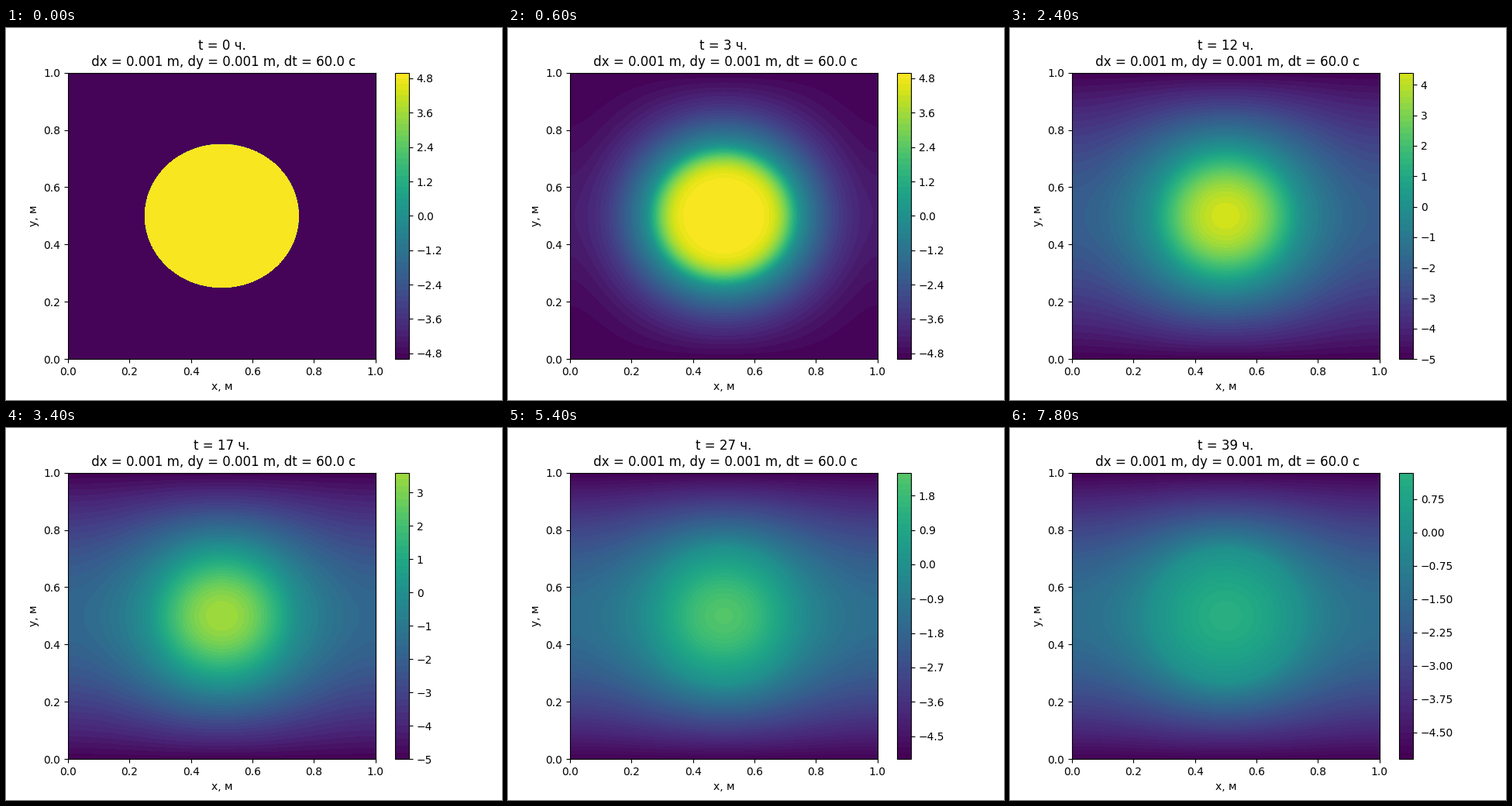
A matplotlib script that plays this animation: 640x480 px, repeating every 8000 ms.

```python
import numpy as np
import matplotlib.pyplot as plt
from matplotlib.animation import FuncAnimation

HOURS = 40
T_HOT, T_COLD, RADIUS = 5.0, -5.0, 0.25

# Water / ice: conductivity, volumetric heat capacity, latent heat
K_W, K_I = 0.56, 2.2
C_W, C_I = 4.2e6, 1.926e6
LATENT = 3.2e8
SMEAR = 0.1            # half-width of the melting range, degrees

# Piecewise-linear links between temperature, enthalpy and heat potential
T_PTS = np.array([-10, -SMEAR, SMEAR, 10])
SPAN = 10 - SMEAR
H_PTS = np.array([-C_I * SPAN, 0, LATENT, LATENT + C_W * SPAN])
MUSH = SMEAR * (K_W + K_I)
U_PTS = np.array([-K_I * SPAN, 0, MUSH, MUSH + K_W * SPAN])

N = 80                 # cells in one quarter of the unit square
CELL = 0.5 / N
STEPS = 500            # time steps per hour


def start_enthalpy():
    sub = 8
    c = (np.arange(N * sub) + 0.5) * CELL / sub
    inside = np.hypot(c[:, None], c[None, :]) <= RADIUS
    part = inside.reshape(N, sub, N, sub).mean(axis=(1, 3))
    hot, cold = np.interp([T_HOT, T_COLD], T_PTS, H_PTS)
    return part * hot + (1 - part) * cold


def advance(h):
    """One hour of conduction: cold top edge, insulated sides."""
    k = 3600 / STEPS / CELL**2
    edge = np.interp(T_COLD, T_PTS, U_PTS)
    for _ in range(STEPS):
        u = k * np.interp(h, H_PTS, U_PTS)
        gx = u[:, 1:] - u[:, :-1]
        gy = u[1:] - u[:-1]
        h[:, :-1] += gx
        h[:, 1:] -= gx
        h[:-1] += gy
        h[1:] -= gy
        h[-1] += 2 * (k * edge - u[-1])


def unfold(h):
    """Mirror the quarter into the full square, edges included."""
    q = np.clip(np.interp(h, H_PTS, T_PTS), T_COLD, T_HOT)
    half = np.hstack([q[:, ::-1], q])
    full = np.vstack([half[::-1], half])
    full = np.pad(full, ((0, 0), (1, 1)), mode="edge")
    return np.pad(full, ((1, 1), (0, 0)), constant_values=T_COLD)


def solve():
    fine = np.linspace(0, 1, 1001)
    disc = np.hypot(fine[:, None] - 0.5, fine[None, :] - 0.5) <= RADIUS
    states = [(fine, np.where(disc, T_HOT, T_COLD))]
    grid = np.concatenate([[0], (np.arange(2 * N) + 0.5) * CELL, [1]])
    h = start_enthalpy()
    for _ in range(1, HOURS):
        advance(h)
        states.append((grid, unfold(h)))
    return states


def levels_for(top):
    step = 0.2 if top > 2.58 else 0.15
    low = np.floor(T_COLD / step)
    high = np.ceil(top / step - 1e-6)
    return np.arange(low, high + 1) * step


states = solve()
fig = plt.figure(figsize=(6.4, 4.8), dpi=100)


def draw(hour):
    fig.clear()
    ax = fig.add_subplot()
    grid, temp = states[hour]
    filled = ax.contourf(grid, grid, temp, levels=levels_for(temp.max()),
                         vmin=T_COLD, vmax=T_HOT, cmap="viridis")
    fig.colorbar(filled, ax=ax)
    ax.set_title(f"t = {hour} ч.\n dx = 0.001 m, dy = 0.001 m, dt = 60.0 c")
    ax.set_xlabel("x, м")
    ax.set_ylabel("y, м")
    return []


anim = FuncAnimation(fig, draw, frames=HOURS, interval=200, repeat=True,
                     repeat_delay=0)
plt.show()
```
